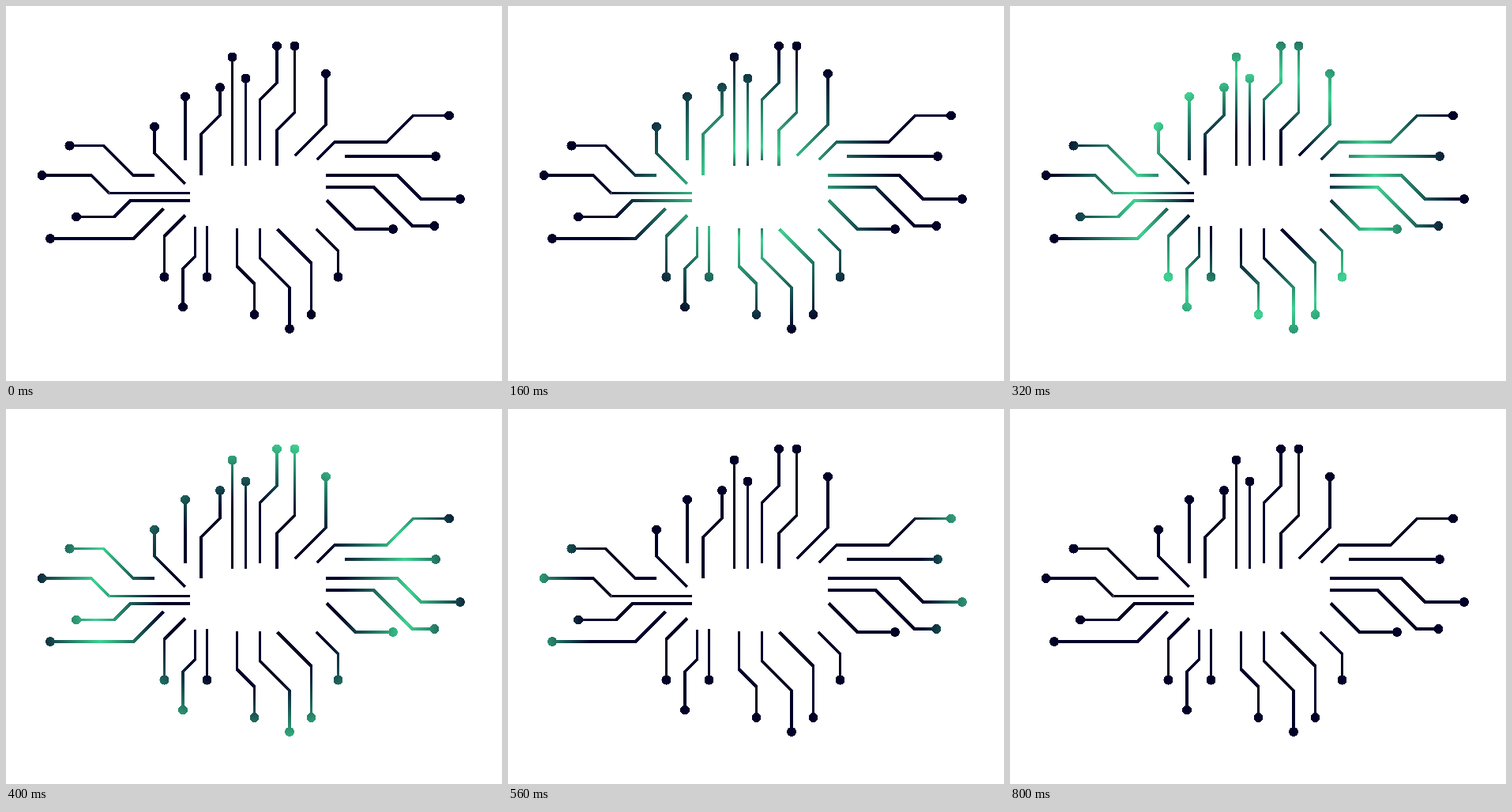
Recreate the animation shown at these times as an HTML page. Size 628 by 474 pixels, loop 1600 ms.

```html
<!DOCTYPE html>
<html lang="en">
<head>
<meta charset="utf-8">
<title>Circuit pulse</title>
<style>
  html, body { margin: 0; width: 100%; height: 100%; overflow: hidden; background: #fff; }
  svg { display: block; shape-rendering: crispEdges; }
</style>
</head>
<body>
<svg width="628" height="474" viewBox="0 0 628 474">
  <defs>
    <radialGradient id="glow" gradientUnits="userSpaceOnUse" cx="311" cy="237" r="400">
      <stop stop-color="#000028"/>
      <stop id="crest"/>
      <stop stop-color="#000028"/>
    </radialGradient>
  </defs>
  <path id="lines" fill="none" stroke="url(#glow)" stroke-width="3.6"/>
  <path id="dots" fill="url(#glow)"/>
</svg>
<script>
const LOOP = 1600, STEP = 40, PULSE = 640, REACH = 400, DOT = 6;
const HUB = 'hub';

// A trace starts at its dot (x, y), then alternates straight and 45° runs.
// A diagonal's sign is its sideways drift; HUB runs on to the side's edge.
const sides = [
  { dir: [0, 1], edge: 202, traces: [
    [286.5, 64.5, HUB], [303.5, 91.5, HUB],
    [343, 50.5, 46.5, -21.5, 76], [365.5, 50.5, 84, -22.5, HUB],
    [405, 85.5, 64.5, -39.5], [271, 103, 35, -24, 51.5],
    [227, 114.5, 80], [188, 152.5, 33.5, 39]
  ] },
  { dir: [0, -1], edge: 281, traces: [
    [200.5, 342.5, 51.5, 26.5], [224, 380.5, 48.5, 15.5, 38],
    [254.5, 342.5, 64.5], [314.5, 390, 39, -22, HUB],
    [359, 408, 52, -37.5, HUB], [386.5, 390, 65, -43],
    [420.5, 342.5, 33, -27.5]
  ] },
  { dir: [1, 0], edge: 233, traces: [
    [80.5, 176.5, 43, 37.5, 26.5], [45.5, 214, 62.5, 22.5, HUB],
    [89, 266.5, 48, -20.5, HUB], [56, 294, 105.5, -38]
  ] },
  { dir: [-1, 0], edge: 405, traces: [
    [561, 138.5, 45.5, 33.5, 66, 22.5], [544, 190, 115.5],
    [575, 244, 49.5, -30, HUB], [542.5, 278, 28, -49, HUB],
    [490, 282, 47.5, -36.5]
  ] }
];

const $ = id => document.getElementById(id);

function tracePath([x, y, ...runs], [dx, dy], edge) {
  let path = `M${x} ${y}`;
  runs.forEach((run, i) => {
    const length = Math.abs(run === HUB ? edge - (dx ? x : y) : run);
    const drift = i % 2 ? run : 0;
    x += dx ? dx * length : drift;
    y += dy ? dy * length : drift;
    path += `L${x} ${y}`;
  });
  return path;
}

const dotPath = ([x, y]) =>
  `M${x - DOT} ${y}a${DOT} ${DOT} 0 1 0 ${2 * DOT} 0a${DOT} ${DOT} 0 1 0 ${-2 * DOT} 0`;

$('lines').setAttribute('d', sides.flatMap(({ dir, edge, traces }) =>
  traces.map(trace => tracePath(trace, dir, edge))).join(''));
$('dots').setAttribute('d', sides.flatMap(side => side.traces.map(dotPath)).join(''));

// The ring's crest moves steadily; its tail speeds up and its front slows down.
function ringRadii(p) {
  const inner = 10 + 265 * p * p;
  const crest = Math.max(inner, 374 * p - 34);
  return [inner, crest, 365 * Math.sqrt(p)];
}

const stops = [...document.querySelectorAll('stop')];

function draw(now) {
  const p = Math.floor(now % LOOP / STEP) * STEP / PULSE;
  const lit = p > 0 && p < 1;
  $('crest').setAttribute('stop-color', lit ? '#40d292' : '#000028');
  if (lit) ringRadii(p).forEach((r, i) => stops[i].setAttribute('offset', r / REACH));
}

const start = performance.now();
function tick() {
  draw(performance.now() - start);
  requestAnimationFrame(tick);
}
tick();
</script>
</body>
</html>
```
